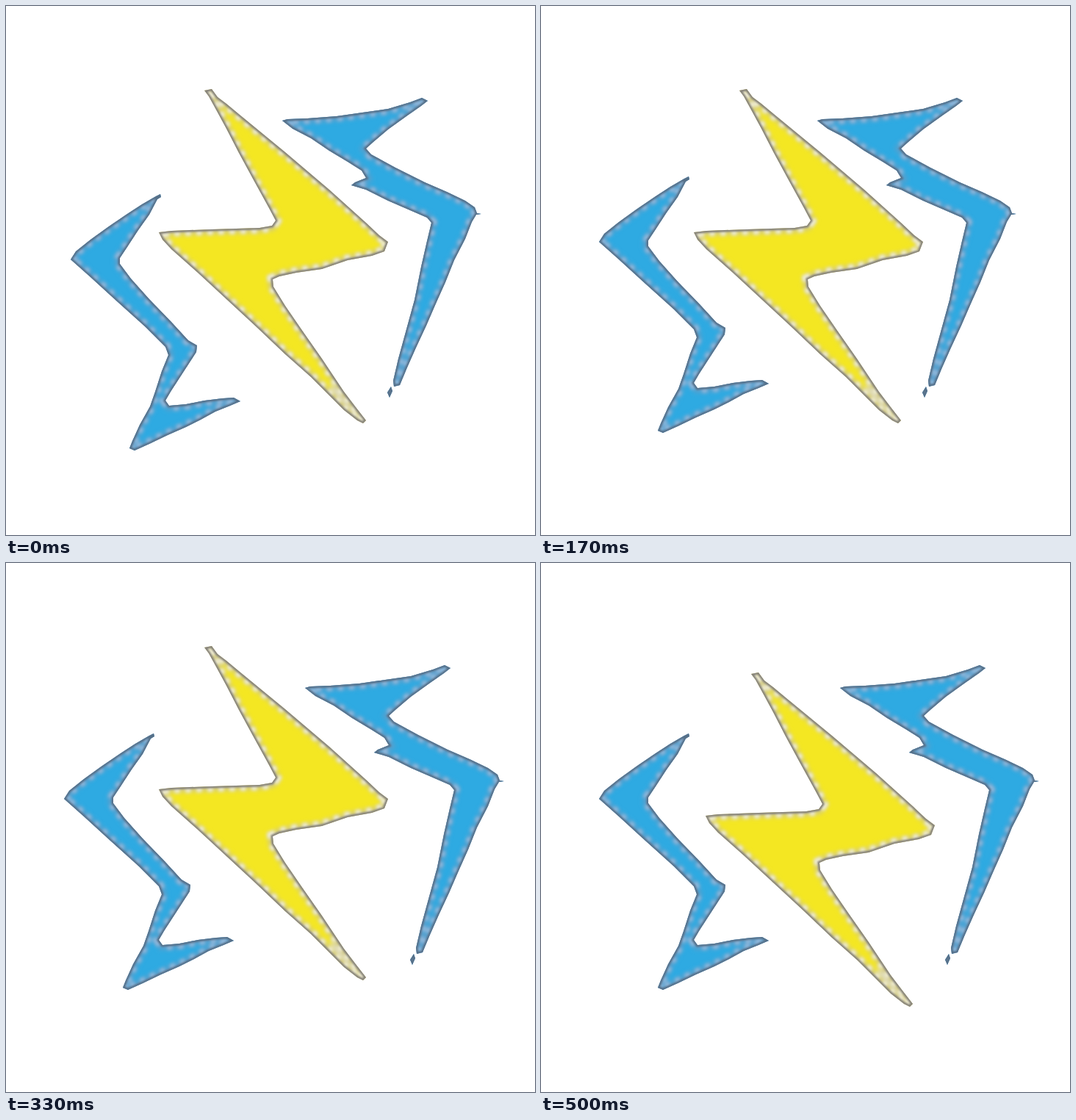
Write an HTML page that moves like this. It is 720 px wide and 720 px high and loops after 0.66 s.

```html
<!DOCTYPE html>
<html>
<head>
<meta charset="utf-8">
<style>
html, body { margin: 0; width: 100%; height: 100%; overflow: hidden; background: #fff; }
svg { display: block; width: 100vw; height: 100vh; }
</style>
</head>
<body>
<svg id="stage" viewBox="0 0 720 720"></svg>
<script>
const LOOP = 660;
const blue = { fill: '#2eaae2', band: '#5c9fcb', glow: '#8db6da', edge: '#566f88' };
const yellow = { fill: '#f4e722', band: '#d3cb83', glow: '#efecd2', edge: '#85827a' };

// Each bolt jumps once per loop: at time `at`, by `move`.
const bolts = [
  { id: 'left', ...blue, at: 170, move: [-9, -24],
    d: 'M204 259 210 256 211 260 206 263 195 284 180 305 165 328 155 343 155 351 170 371 195 399 225 430 248 455 260 462 259 471 248 488 235 508 224 525 217 537 222 544 245 542 270 537 295 534 310 533 319 538 305 544 285 552 265 563 245 573 220 584 195 596 175 605 168 602 172 592 182 570 196 545 203 525 212 497 221 475 217 464 190 437 150 401 115 369 88 345 95 334 115 318 140 300 165 283 185 270Z' },
  { id: 'right', ...blue, at: 330, move: [31, 14],
    d: 'M376 156 383 154 410 153 450 150 485 145 520 140 550 131 566 125 574 129 565 136 545 150 520 168 500 185 490 194 497 202 530 220 570 240 600 253 625 265 638 274 641 282 647 283 640 284 634 294 625 317 610 346 598 376 585 405 572 435 558 465 546 492 536 516 528 518 527 510 534 480 545 440 556 400 565 355 573 320 579 295 573 288 550 278 520 265 490 250 470 244 475 240 490 234 484 224 465 212 440 197 415 180 390 167ZM519 526 524 518 526 524 522 533Z' },
  { id: 'middle', ...yellow, at: 500, move: [16, 36],
    tips: 'M278 116 291 134M488 566 446 516',
    d: 'M270 115 280 113 288 124 300 133 318 148 380 199 440 250 490 295 508 312 520 321 515 334 498 340 465 346 430 358 395 363 372 368 363 372 364 382 380 408 402 440 430 480 460 525 476 546 490 564 486 568 478 564 460 550 440 530 415 505 380 474 340 436 300 399 260 362 225 331 213 318 208 308 225 306 280 304 345 302 362 299 367 292 358 275 336 235 317 200 300 167 287 143 276 123Z' }
];

const stage = document.getElementById('stage');
const blur = n =>
  `<filter id="blur${n}" filterUnits="userSpaceOnUse" x="0" y="0" width="720" height="720"><feGaussianBlur stdDeviation="${n}"/></filter>`;
const line = (d, color, width, n, extra = '') =>
  `<path d="${d}" fill="none" stroke="${color}" stroke-width="${width}" filter="url(#blur${n})" ${extra}/>`;

stage.innerHTML = [1, 2, 3, 5].map(blur).join('');
for (const b of bolts) {
  stage.insertAdjacentHTML('beforeend', `
    <clipPath id="clip-${b.id}"><path d="${b.d}"/></clipPath>
    <g id="${b.id}"><g clip-path="url(#clip-${b.id})">
      <path d="${b.d}" fill="${b.fill}"/>
      ${b.tips ? line(b.tips, '#e0ddcf', 20, 5) : ''}
      ${line(b.d, b.band, 13, 3)}
      ${line(b.d, b.glow, 15, 2, 'stroke-dasharray="7 8"')}
      ${line(b.d, b.edge, 5, 1)}
    </g></g>`);
  b.node = document.getElementById(b.id);
}

function draw(now) {
  const t = now % LOOP;
  for (const b of bolts) {
    const [x, y] = t >= b.at ? b.move : [0, 0];
    b.node.setAttribute('transform', `translate(${x} ${y})`);
  }
  requestAnimationFrame(draw);
}
draw(0);
</script>
</body>
</html>
```
